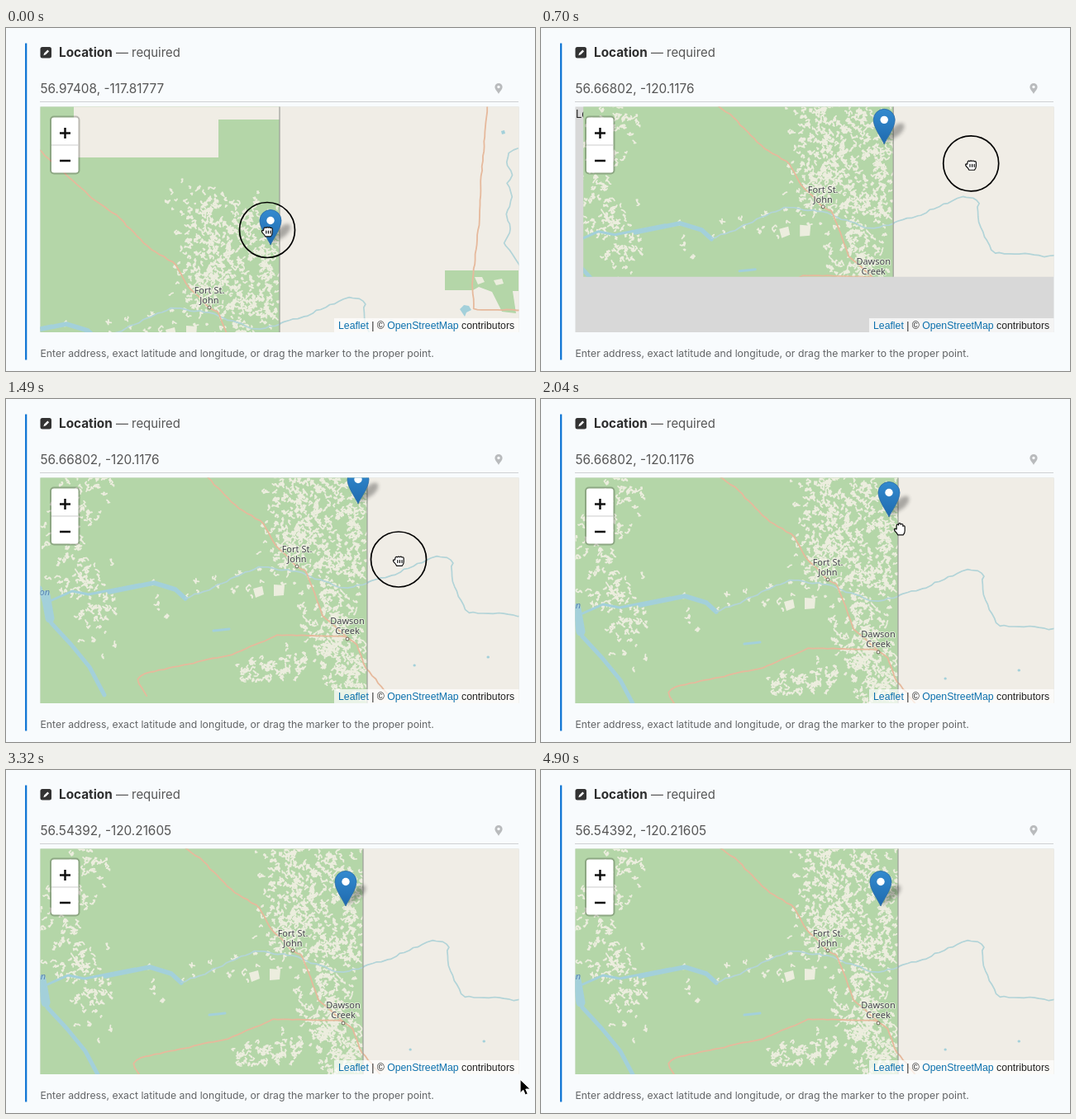
Recreate the animation shown at these times as an HTML page. Size 640 by 416 pixels, loop 4.93 s.

```html
<!DOCTYPE html>
<html lang="en">
<head>
<meta charset="utf-8">
<title>Location picker</title>
<style>
  html, body { margin: 0; width: 100%; height: 100%; overflow: hidden; background: #f8fbfd; }
  svg { display: block; }
  #stage { width: 100%; height: 100%; }
  text { font-family: Inter, "Open Sans", sans-serif; }
  .place text { font: 11px "Noto Sans", sans-serif; fill: #44444c; text-anchor: middle;
    paint-order: stroke; stroke: #f4f6ea; stroke-opacity: .7; stroke-width: 2px; stroke-linejoin: round; }
  .place circle { fill: #f6f2ea; stroke: #665; }
  .lake { font: italic 11px "Noto Sans", sans-serif; fill: #5b86b5; text-anchor: end; }
  .credit { font: 12.25px "Liberation Sans", Arial, sans-serif; fill: #222; }
  .credit tspan { fill: #0b70ad; }
  .line { fill: none; stroke-linecap: round; stroke-linejoin: round; }
  .water { stroke: #a3d0da; }
  .stream { stroke: #b2d4d8; stroke-width: 1.7; }
  .road { stroke: #e6b99c; stroke-width: 1.8; }
  #clearings { stroke: #ecedde; stroke-width: 1.7; }
</style>
</head>
<body>
<svg id="stage" viewBox="0 0 640 416">
  <defs>
    <linearGradient id="pinFill" x2="0" y2="1">
      <stop stop-color="#338acf"/><stop offset="1" stop-color="#1f6aae"/>
    </linearGradient>
    <filter id="soft" x="-50%" y="-50%" width="200%" height="200%"><feGaussianBlur stdDeviation="2"/></filter>
    <clipPath id="loaded"><rect id="tiles" y="-100" width="900"/></clipPath>
    <!-- Farmland follows these belts -->
    <path class="belt" data-spread="21" data-count="170" d="M80 95L100 130 62 170 70 215 95 250 105 305"/>
    <path class="belt" data-spread="26" data-count="330" d="M335 80L345 130 365 165 340 190 400 225"/>
    <path class="belt" data-spread="22" data-count="170" d="M385 100L415 140 418 215"/>
    <path class="belt" data-spread="24" data-count="230" d="M395 250L385 290 405 330 420 369"/>
    <path class="belt" data-spread="13" data-count="100" d="M280 345L330 338 400 318"/>
    <path class="belt" data-spread="16" data-count="20" d="M130 280L240 240 340 240"/>
  </defs>

  <rect width="640" height="416" fill="#f8fbfd"/>
  <path d="M24.200 18.500V402.500" stroke="#0972d3" stroke-width="2.200"/>
  <rect x="41.500" y="23" width="13.500" height="13.500" rx="2.500" fill="#333"/>
  <path d="M45.300 33.200l1-2.700 4-4 1.800 1.800-4 4z" fill="#fff"/>
  <text x="64" y="35" font-size="15.300" font-weight="700" fill="#2d2d2d">Location</text>
  <text x="133" y="35" font-size="14.900" fill="#555">— required</text>
  <text id="value" x="41.500" y="79" font-size="15.350" fill="#555"></text>
  <path d="M596 80c-1-2.600-4.600-5.300-4.600-8.500a4.600 4.600 0 0 1 9.200 0c0 3.200-3.600 5.900-4.600 8.500z" fill="#b9bbbd"/>
  <circle cx="596" cy="71.500" r="1.700" fill="#f8fbfd"/>
  <path d="M41 89.500H620" stroke="#cfd1d3"/>

  <svg x="41.500" y="95.500" width="579" height="273.500" viewBox="41.500 95.500 579 273.500">
    <rect x="41" y="95" width="580" height="275" fill="#d8d8d8"/>
    <text x="42" y="109" font-size="13" fill="#222">Loading</text>

    <g id="map" clip-path="url(#loaded)">
      <rect x="-50" y="-100" width="482" height="600" fill="#b4d6a8"/>
      <path d="M183-100V37H358V-9H433V-100z" fill="#f0ede5"/>
      <path id="clearings" class="line"/>
      <path d="M294 246l11-3 2 10-10 4zM319 241l13 1-1 12-12 1z" fill="#ecedde"/>
      <rect x="432" y="-100" width="500" height="600" fill="#f0ede6"/>

      <path class="line water" stroke-width="5" d="M36 245L50 288 74 314 96 341 114 375"/>
      <path class="line water" stroke-width="11" d="M43 254L48 282"/>
      <path class="line water" stroke-width="3" d="M46 262L75 249 95 253 156 241"/>
      <path class="line water" stroke-width="5.500" d="M120 250L174 239 200 247 212 258"/>
      <path class="line stream" d="M212 258L253 241 300 219 352 226 400 246 432 239"/>
      <path class="line stream" d="M432 239L465 229 515 207 536 211 534 232 552 274 650 281"/>
      <path class="line water" stroke-width="3" d="M246 297L265 295M578 329h.5M489 339h.3"/>
      <path class="line road" d="M135 22L206 87 237 109 275 148 305 165 320 192 347 219 358 225 368 250 378 279 407 304 419 314 429 340 457 374"/>
      <path class="line road" d="M407 304L325 302 268 326 235 333 160 350 153 357 165 376"/>

      <g transform="translate(101 -120)">
        <path d="M531 294H620V319H613L617 346 600 344 588 320 572 314 565 318H531z" fill="#b4d6a8"/>
        <path d="M567 302h9l3 6-8 3zM590 306l10-2 2 6-9 2z" fill="#ecedde"/>
        <path class="line stream" d="M620 147L609 151 605 164 613 178 606 190 613 205 605 225 611 245 603 262 622 290"/>
        <path d="M549 341l5-5 6 1 3 5-6 3-2 5zM599 125l4-1 1 4-4 1z" fill="#a3d0da"/>
        <path class="line road" d="M583 90L575 180 572 240 564 310 566 342H630"/>
      </g>

      <path d="M432-100V500" stroke="#9b9d98" stroke-width="1.200"/>
      <g class="place">
        <circle cx="347" cy="219" r="2"/><circle cx="408" cy="307" r="2"/>
        <text x="347" y="202">Fort St.</text><text x="347" y="214">John</text>
        <text x="408" y="289">Dawson</text><text x="408" y="301">Creek</text>
      </g>
      <text class="lake" x="48" y="254">on</text>
    </g>

    <g id="marker">
      <path d="M0 0L9-18Q16-27 23-25 27-20 18-11z" fill="#222" opacity=".34" filter="url(#soft)"/>
      <path d="M0 0C-3-7-13-20-13-29.500a13 13 0 0 1 26 0C13-20 3-7 0 0z" fill="url(#pinFill)" stroke="#2a6aa5" stroke-width=".8"/>
      <circle cy="-29.500" r="4.700" fill="#fff"/>
    </g>

    <rect x="53" y="106.500" width="36.500" height="71" rx="5" fill="#000" opacity=".22"/>
    <rect x="55" y="108.500" width="32.500" height="67" rx="3" fill="#fff"/>
    <path d="M55 142H87.500" stroke="#ccc"/>
    <path d="M65 127.500H78M71.500 121V134M65 161H78" stroke="#111" stroke-width="2.500"/>
    <rect x="397" y="352" width="224" height="18" fill="#fff" opacity=".72"/>
    <text class="credit" x="402" y="364.500"><tspan>Leaflet</tspan> | © <tspan>OpenStreetMap</tspan> contributors</text>
  </svg>

  <text x="41.500" y="398.500" font-size="12.250" fill="#636567">Enter address, exact latitude and longitude, or drag the marker to the proper point.</text>

  <g id="cursor" stroke-linejoin="round" stroke-linecap="round">
    <g id="fist" stroke="#111" stroke-width="1.200">
      <circle r="33.500" fill="none" stroke="#000" stroke-width="1.700"/>
      <path transform="translate(1 1)" d="M-5-3q1.200-2 2.600-.6 1.300-1.600 2.600-.2 1.600-1.200 2.600.3 2.200-.6 2.400 1.400v4q0 3-2 5h-6.500q-1-2.200-3-4-2-2.200-.8-3.400l1.600.2z" fill="#fff"/>
      <path transform="translate(1 1)" d="M-2.200 0v3M.4 0v3M3 0v3"/>
    </g>
    <path id="hand" d="M-5 0v-5q1.200-1.600 2.400 0v-1.500q1.300-1.600 2.600 0v.8q1.300-1.400 2.600 0v2q2-1 2.400.8v4.800q0 3-2 5h-6.500q-1-2.200-3-4-2-2.200-.8-3.400z" fill="#fff" stroke="#111" stroke-width="1.200"/>
    <path id="arrow" d="M0 0v16l3.700-3.500 2.500 5.800 3-1.300-2.500-5.600h5.200z" fill="#000" stroke="#fff"/>
  </g>
</svg>

<script>
const LOOP = 4930, DROP = 120, GRIP = 40, HOLD = 80;
const $ = id => document.getElementById(id);
const add = (a, b) => [a[0] + b[0], a[1] + b[1]];
const mix = (a, b, k) => a.map((v, i) => v + (b[i] - v) * k);

const home = { map: [-101, 120], marker: [421, 143] };
const drags = [
  { part: 'map', from: 360, to: 785, start: [425, 286.5], by: [106, -136] },
  { part: 'map', from: 1500, to: 1720, start: [475, 194.5], by: [-5, 16] },
  { part: 'marker', from: 2220, to: 2640, start: [420, 135], by: [-10, 22] }
];
const values = ['56.97408, -117.81777', '56.66802, -120.1176', '56.54392, -120.21605'];

// The pointer glides between drags and finally leaves the stage
const stops = [
  { time: DROP, at: [316, 245] },
  ...drags.flatMap(({ from, to, start, by }) => [
    { time: from - GRIP, at: start }, { time: from, at: start },
    { time: to, at: add(start, by) }, { time: to + HOLD, at: add(start, by) }
  ]),
  { time: 3542, at: [668, 423] }
];

function ease(t, from, to) {
  const u = Math.min(1, Math.max(0, (t - from) / (to - from)));
  return u * u * (3 - 2 * u);
}

function partAt(part, t) {
  return drags.filter(drag => drag.part === part).reduce(
    (pos, { from, to, by }) => add(pos, mix([0, 0], by, ease(t, from, to))), home[part]);
}

function pointerAt(t) {
  const next = stops.findIndex(stop => stop.time > t);
  if (next <= 0) return stops.at(next).at;
  const a = stops[next - 1], b = stops[next];
  return mix(a.at, b.at, ease(t, a.time, b.time));
}

let seed = 7;
const rand = () => (seed = seed * 16807 % 2147483647) / 2147483647;
const jitter = size => (rand() * 2 - 1) * size;
const bell = size => (jitter(size) + jitter(size) + jitter(size)) * 0.7;

// Ragged clearings: short random walks scattered along each belt
function plantBelt(belt) {
  const { spread, count } = belt.dataset, length = belt.getTotalLength();
  return Array.from({ length: count }, () => {
    const { x, y } = belt.getPointAtLength(rand() * length);
    const steps = Array.from({ length: 3 + rand() * 10 }, () =>
      `l${jitter(2.2).toFixed(1)} ${jitter(2.2).toFixed(1)}`);
    return `M${(x + bell(spread)).toFixed(1)} ${(y + bell(spread)).toFixed(1)}${steps.join('')}`;
  }).join('');
}

// Gives streams and roads their small bends
function roughen(path, size) {
  const length = path.getTotalLength(), count = Math.ceil(length / 6);
  const points = Array.from({ length: count + 1 }, (_, i) => {
    const { x, y } = path.getPointAtLength(length * i / count);
    return `${(x + jitter(size)).toFixed(1)} ${(y + jitter(size)).toFixed(1)}`;
  });
  path.setAttribute('d', `M${points.join('L')}`);
}

function move(id, [x, y]) {
  $(id).setAttribute('transform', `translate(${x.toFixed(2)} ${y.toFixed(2)})`);
}

function show(id, visible) {
  $(id).style.display = visible ? '' : 'none';
}

function render(t) {
  const map = partAt('map', t), pointer = pointerAt(t);
  move('map', map);
  move('marker', add(map, partAt('marker', t)));
  move('cursor', pointer);

  // Missing tiles arrive shortly after the first pan
  $('tiles').setAttribute('x', t < 960 ? 57 : -50);
  $('tiles').setAttribute('height', t < 1040 ? 404 : 600);

  const pressed = t < DROP || drags.some(({ from, to }) => t >= from - GRIP && t < to + HOLD);
  const outside = pointer[0] > 620 || pointer[1] > 369;
  show('fist', pressed);
  show('hand', !pressed && !outside);
  show('arrow', !pressed && outside);

  const drops = [DROP, drags[2].to + HOLD].filter(time => t >= time).length;
  $('value').textContent = values[drops];
}

$('clearings').setAttribute('d', [...document.querySelectorAll('.belt')].map(plantBelt).join(''));
document.querySelectorAll('.stream').forEach(path => roughen(path, 1.3));
document.querySelectorAll('.road').forEach(path => roughen(path, 0.6));
render(0);
const start = performance.now();
requestAnimationFrame(function frame() {
  render((performance.now() - start) % LOOP);
  requestAnimationFrame(frame);
});
</script>
</body>
</html>
```
